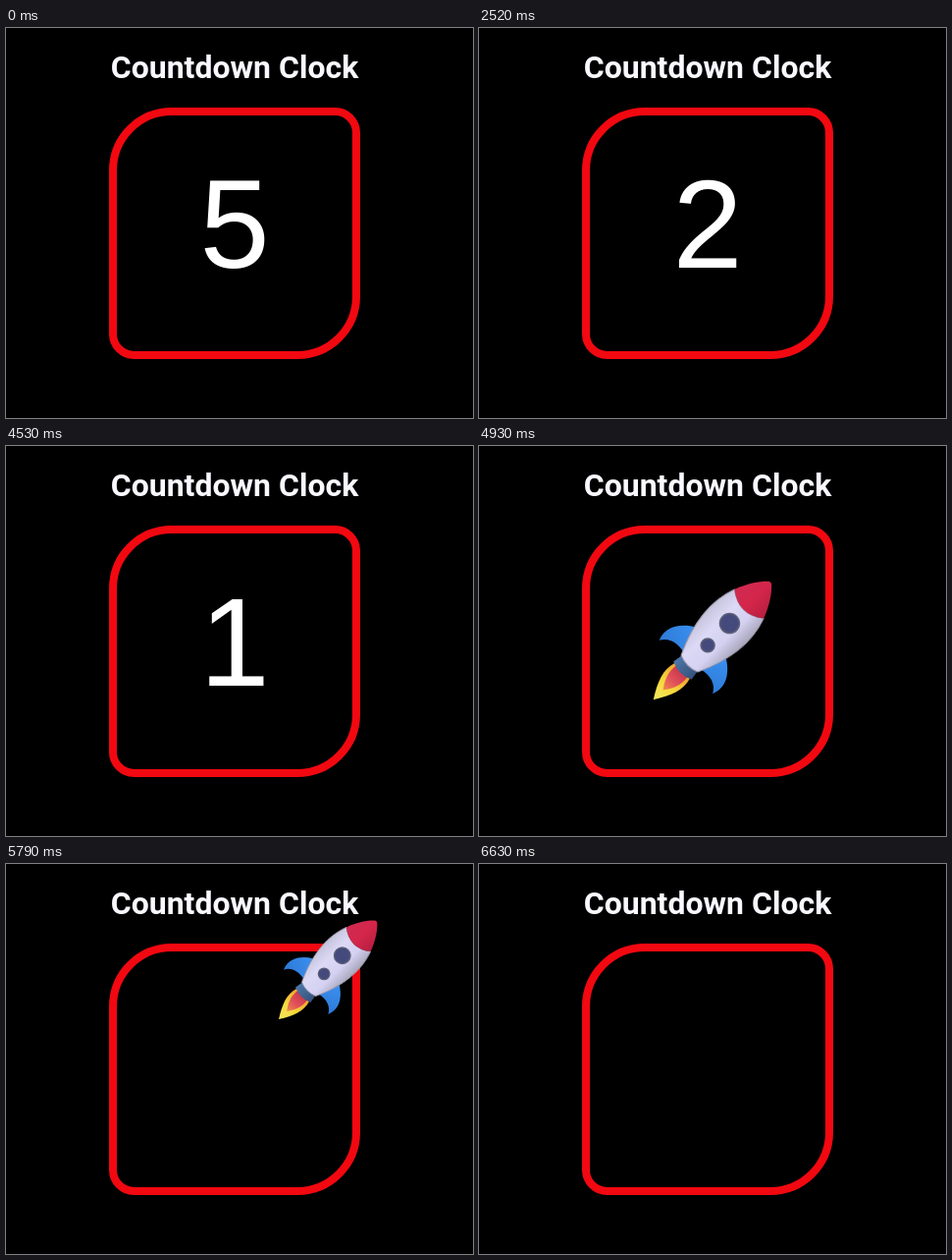
Recreate the animation shown at these times as an HTML page with a canvas. Size 476 px wide and 397 px high, loop 6670 ms.

```html
<!DOCTYPE html>
<html lang="en">
<head>
<meta charset="utf-8">
<title>Countdown Clock</title>
<style>
  html, body { margin: 0; width: 100%; height: 100%; overflow: hidden; background: #000; }
  canvas { display: block; }
</style>
</head>
<body>
<canvas id="stage" width="476" height="397"></canvas>
<script>
const ctx = document.getElementById('stage').getContext('2d');
const LOOP = 6670;
const LAUNCH = 4540;
const FLIGHT = 2000;
const STEPS = [[0, '5'], [530, '4'], [1520, '3'], [2520, '2'], [3540, '1']];
const CENTER = 233;

function text(str, font, y, color) {
  ctx.font = font;
  ctx.fillStyle = color;
  ctx.textAlign = 'center';
  ctx.textBaseline = 'alphabetic';
  ctx.fillText(str, CENTER, y);
}

function gradient(x0, y0, x1, y1, colors) {
  const g = ctx.createLinearGradient(x0, y0, x1, y1);
  colors.forEach((c, i) => g.addColorStop(i / (colors.length - 1), c));
  return g;
}

function shape(d, fill) {
  ctx.fillStyle = fill;
  ctx.fill(new Path2D(d));
}

function porthole(y, r) {
  ctx.beginPath();
  ctx.arc(0, y, r, 0, Math.PI * 2);
  ctx.fillStyle = '#454a7c';
  ctx.fill();
  ctx.lineWidth = 1.5;
  ctx.strokeStyle = '#5c6076';
  ctx.stroke();
}

function fin(side) {
  ctx.save();
  ctx.scale(side, 1);
  shape('M23 2 C34 9 45 21 38.5 37 C34 28 24 25 12 28 Z',
    gradient(20, 4, 36, 36, ['#3a8ff0', '#2e7bd6']));
  ctx.restore();
}

// Drawn nose up around its own centre, then tilted by 45 degrees.
function rocket(x, y, scale) {
  ctx.save();
  ctx.translate(x, y);
  ctx.rotate(Math.PI / 4);
  ctx.scale(scale, scale);

  shape('M-11 42 C-15 56 -10 68 0 84 C10 68 15 56 11 42 Z',
    gradient(0, 42, 0, 84, ['#f0a030', '#f6d83c', '#f4e860']));
  shape('M-8 42 C-10 54 -6 62 0 70 C6 62 10 54 8 42 Z',
    gradient(0, 42, 0, 70, ['#c8364a', '#e0505a', '#f08a48']));
  fin(-1);
  fin(1);
  shape('M-11 30 H11 L13 42 Q0 48 -13 42 Z',
    gradient(-13, 0, 13, 0, ['#4c78ac', '#41648f', '#34527c']));

  const hull = 'M-21 -54 C-29 -32 -29 -4 -12 32 Q0 37 12 32 C29 -4 29 -32 21 -54 Q0 -38 -21 -54 Z';
  shape(hull, gradient(-27, 0, 27, 0, ['#c4c2da', '#dcd9f6', '#d4d1f2', '#a6a4b8']));
  ctx.lineWidth = 1;
  ctx.strokeStyle = '#9a98aa';
  ctx.stroke(new Path2D(hull));
  shape('M-21 -54 C-16 -68 -8 -79 -2 -84.5 Q0 -86 2 -84.5 C8 -79 16 -68 21 -54 Q0 -38 -21 -54 Z',
    gradient(-20, 0, 20, 0, ['#d02a50', '#d4264a', '#b81f40']));
  porthole(-26, 10);
  porthole(5.6, 7);
  ctx.restore();
}

function frame() {
  ctx.beginPath();
  ctx.roundRect(109, 85, 248, 248, [60, 21.6, 60, 21.6]);
  ctx.lineWidth = 8;
  ctx.strokeStyle = '#f20810';
  ctx.stroke();
}

function draw(t) {
  ctx.fillStyle = '#000';
  ctx.fillRect(0, 0, 476, 397);
  text('Countdown Clock', 'bold 32px Roboto, sans-serif', 51, '#faf8ff');
  frame();
  if (t < LAUNCH) {
    const digit = STEPS.filter(([start]) => t >= start).pop()[1];
    text(digit, '128px "Liberation Sans", Arial, sans-serif', 244, '#fff');
  } else {
    const p = Math.min((t - LAUNCH) / FLIGHT, 1) ** 2.2;
    rocket(229.5 + 275 * p, 206.5 - 275 * p, 1.013 * (1 - p / 2));
  }
}

const begin = performance.now();
function tick() {
  draw((performance.now() - begin) % LOOP);
  requestAnimationFrame(tick);
}
tick();
</script>
</body>
</html>
```
